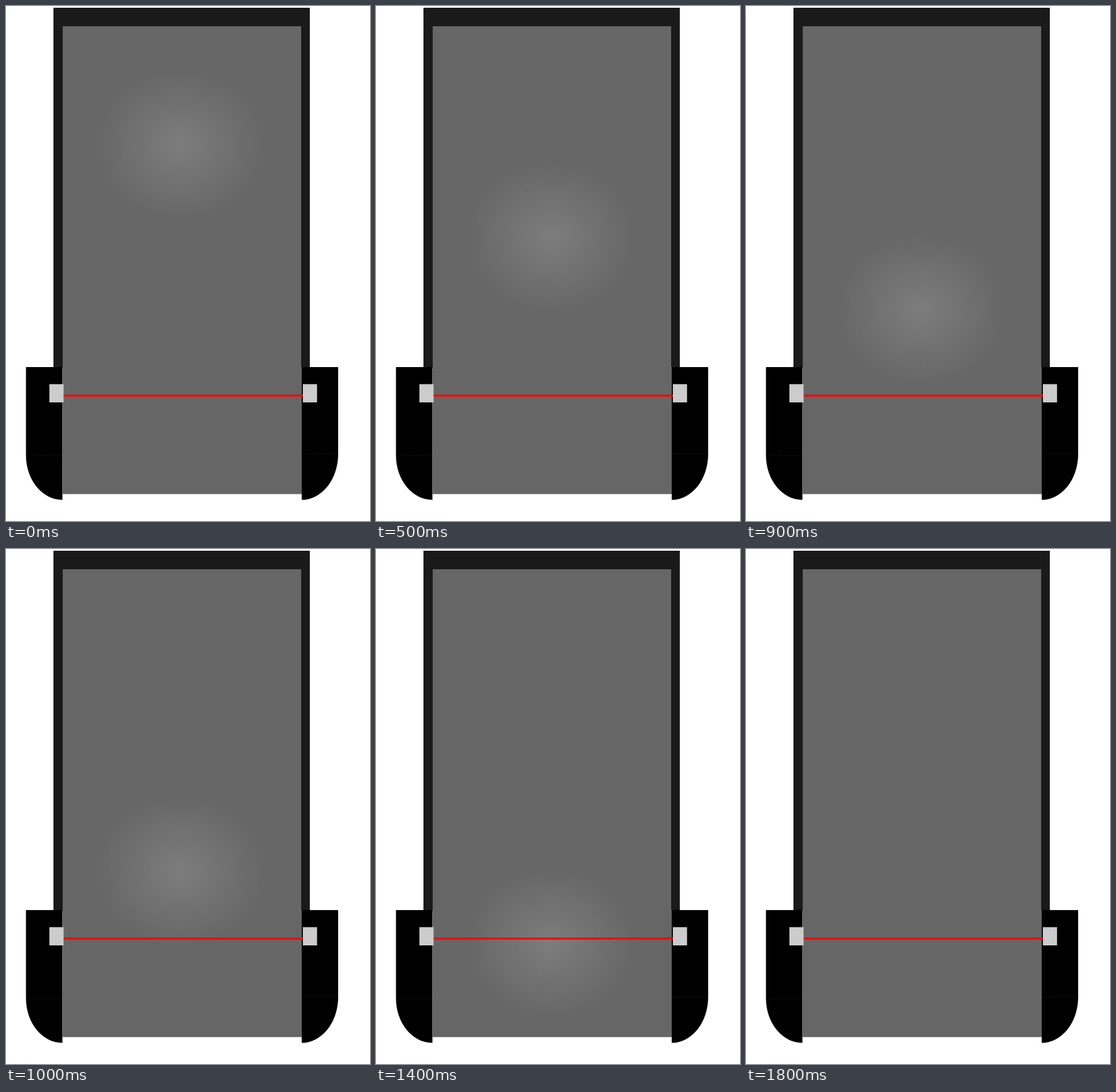
An HTML page for the animation above (1900 ms loop, 629 px wide and 890 px high).

```html
<!DOCTYPE html>
<html lang="en">
<head>
<meta charset="utf-8">
<title>Light moving down a panel</title>
<style>
  html, body { margin: 0; width: 100%; height: 100%; overflow: hidden; background: #fff; }
  svg { display: block; width: 100vw; height: 100vh; }
</style>
</head>
<body>
<svg viewBox="0 0 629 890">
  <defs>
    <radialGradient id="light">
      <stop offset="0" stop-color="#7d7d7d"/>
      <stop offset="1" stop-color="#666"/>
    </radialGradient>
    <clipPath id="panel"><path d="M98 35H510V624H511V843.5H97.5V624H98Z"/></clipPath>
  </defs>

  <path d="M82 3H525V626H82Z" fill="#1a1a1a"/>
  <path d="M34.5 624H97.5V853.5A63 77 0 0 1 34.5 776.5Z"/>
  <path d="M574 624H511V853.5A63 79.5 0 0 0 574 774Z"/>
  <path d="M35 777H97M512 773.5H573" stroke="#151515" stroke-dasharray="3 2"/>

  <g clip-path="url(#panel)">
    <rect x="97" y="35" width="415" height="809" fill="#666"/>
    <ellipse id="glow" cx="302" cy="240" rx="149" ry="132" fill="url(#light)"/>
  </g>

  <path d="M99 673.3H514" stroke="#f00" stroke-width="3.6"/>
  <path d="M75 653.5H99.5V685H75ZM513 653.5H537.5V685H513Z" fill="#ccc"/>
</svg>
<script>
  const STEP = 100, STEPS = 19;
  const glow = document.getElementById('glow');
  // [step, height of the light's centre]
  const path = [[0, 240], [3, 338], [7, 461], [10, 556], [12, 621], [17, 770]];

  function heightAt(step) {
    const i = path.findIndex(p => p[0] >= step);
    if (i < 1) return path[0][1];
    const [s0, y0] = path[i - 1], [s1, y1] = path[i];
    return y0 + (y1 - y0) * (step - s0) / (s1 - s0);
  }

  function draw(ms) {
    const step = Math.floor(ms / STEP) % STEPS;
    const lit = step < STEPS - 1;
    glow.setAttribute('visibility', lit ? 'visible' : 'hidden');
    if (lit) glow.setAttribute('cy', heightAt(step));
  }

  function tick() {
    draw(performance.now());
    requestAnimationFrame(tick);
  }
  tick();
</script>
</body>
</html>
```
